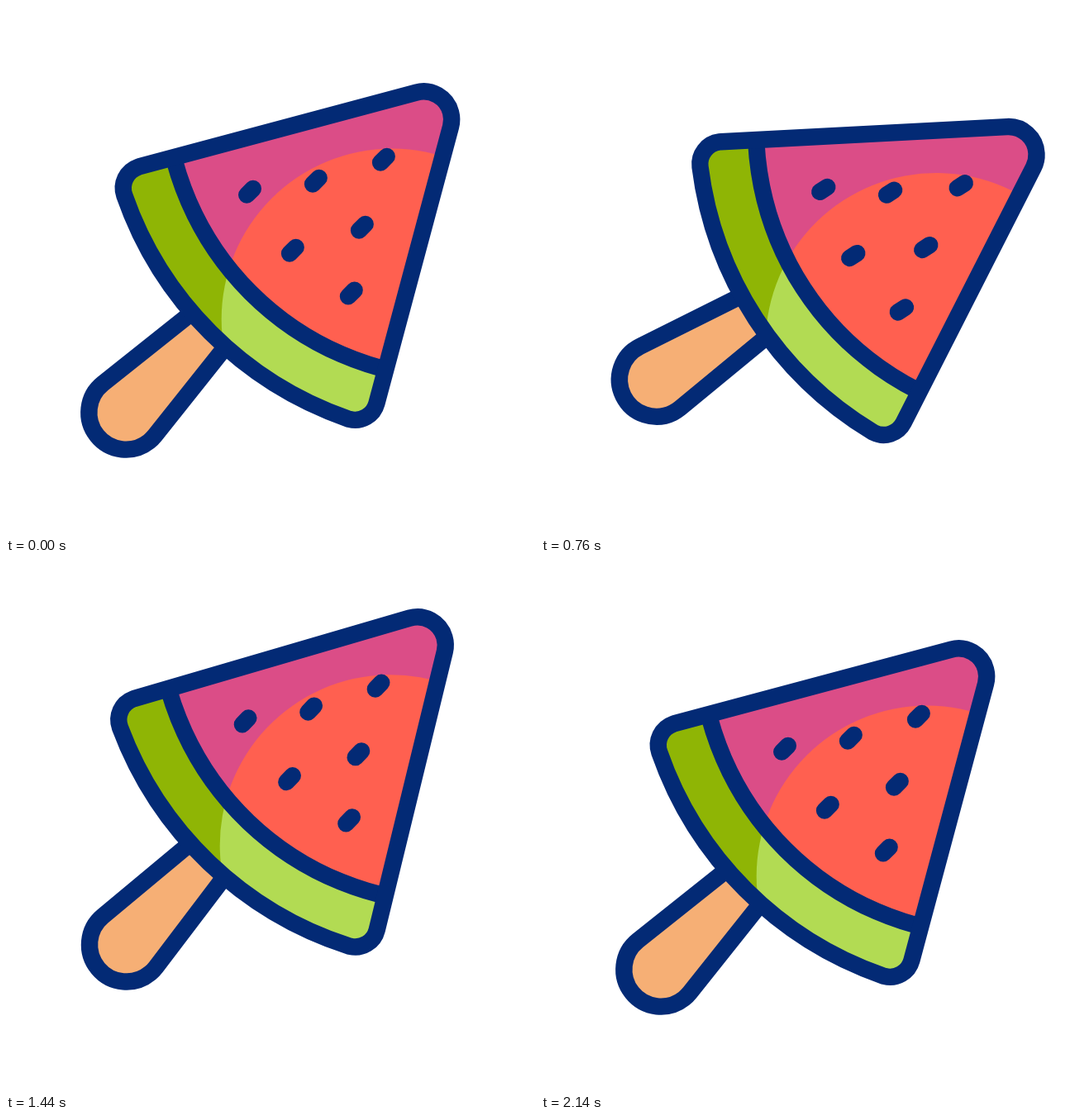
Animation of 640x640 px, one loop 2.4 s. Source, as an HTML page with a canvas:

```html
<!DOCTYPE html>
<html lang="en">
<head>
<meta charset="utf-8">
<title>Watermelon ice pop</title>
<style>
html, body { margin: 0; width: 100%; height: 100%; overflow: hidden; background: #fff; }
canvas { display: block; width: 640px; height: 640px; }
</style>
</head>
<body>
<canvas id="stage" width="640" height="640"></canvas>
<script>
const ctx = document.getElementById('stage').getContext('2d');
const LOOP = 2400, STEP = 20;
const NAVY = '#032a75', PINK = '#db4d87', RED = '#ff6050';
const GREEN = '#8fb505', LIME = '#b2db53', WOOD = '#f6af75';
const rad = d => d * Math.PI / 180;

// Keys: [time in ms, value], eased between neighbours
const swing = [[0, 0], [416, -17.8], [857, 16.2], [1270, -5.6], [1640, 4.2], [2136, 0]];
const bounce = [[0, 0], [364, 56], [725, -36.5], [1070, 55], [1421, -31], [1780, 14], [2136, 0]];
const PIVOT = { x: 171, y: 463 };

function valueAt(keys, t) {
  for (let i = 1; i < keys.length; i++) {
    const [t0, a] = keys[i - 1], [t1, b] = keys[i];
    if (t < t1) {
      const u = (t - t0) / (t1 - t0);
      return a + (b - a) * u * u * (3 - 2 * u);
    }
  }
  return keys[keys.length - 1][1];
}

// Local axes: origin at the tip, y runs down towards the stick
const seeds = [[0, 68.3], [-39.6, 144.7], [39.6, 144.7], [0, 223.9], [-86.8, 210.4], [86.8, 210.4]];

const slice = new Path2D();
const corner = { x: 179.4, y: 296.5, r: 26.9 };
const baseY = -74.5, baseR = 439;
const bend = Math.atan2(corner.y - baseY, corner.x);
slice.arc(0, 0, 34, rad(210), rad(330));
slice.arc(corner.x, corner.y, corner.r, rad(-30), bend);
slice.arc(0, baseY, baseR, bend, Math.PI - bend);
slice.arc(-corner.x, corner.y, corner.r, Math.PI - bend, rad(210));
slice.closePath();

const flesh = new Path2D();
flesh.arc(0, -59, 355, 0, 2 * Math.PI);

const stick = new Path2D();
const flare = rad(6.5), knob = 44.8, knobX = -4, knobY = 505.2, stickTop = 355;
const half = (knob - (knobY - stickTop) * Math.sin(flare)) / Math.cos(flare);
stick.moveTo(knobX - half, stickTop);
stick.arc(knobX, knobY, knob, Math.PI + flare, -flare, true);
stick.lineTo(knobX + half, stickTop);
stick.closePath();

const glow = new Path2D();
const gx = 467 - 505, gy = 379 - 137.4;
glow.arc((gx + gy) * Math.SQRT1_2, (gy - gx) * Math.SQRT1_2, 206.5, 0, 2 * Math.PI);

function fill(path, color) {
  ctx.fillStyle = color;
  ctx.fill(path);
}

function draw(t) {
  ctx.setTransform(1, 0, 0, 1, 0, 0);
  ctx.fillStyle = '#fff';
  ctx.fillRect(0, 0, 640, 640);

  ctx.translate(PIVOT.x, PIVOT.y + valueAt(bounce, t));
  ctx.rotate(rad(valueAt(swing, t)));
  ctx.translate(505.2 - PIVOT.x, 137.4 - PIVOT.y);
  ctx.rotate(Math.PI / 4);

  ctx.strokeStyle = NAVY;
  ctx.lineWidth = 20.4;
  ctx.lineCap = 'round';
  ctx.lineJoin = 'round';

  fill(stick, WOOD);
  ctx.stroke(stick);

  ctx.save();
  ctx.clip(slice);
  fill(slice, GREEN);
  fill(glow, LIME);
  ctx.save();
  ctx.clip(flesh);
  fill(slice, PINK);
  fill(glow, RED);
  ctx.restore();
  ctx.stroke(flesh);
  ctx.restore();
  ctx.stroke(slice);

  ctx.beginPath();
  for (const [x, y] of seeds) {
    ctx.moveTo(x, y - 5.4);
    ctx.lineTo(x, y + 5.4);
  }
  ctx.stroke();
}

const start = performance.now();
function tick() {
  const t = (performance.now() - start) % LOOP;
  draw(Math.floor(t / STEP) * STEP);
  requestAnimationFrame(tick);
}
tick();
</script>
</body>
</html>
```
